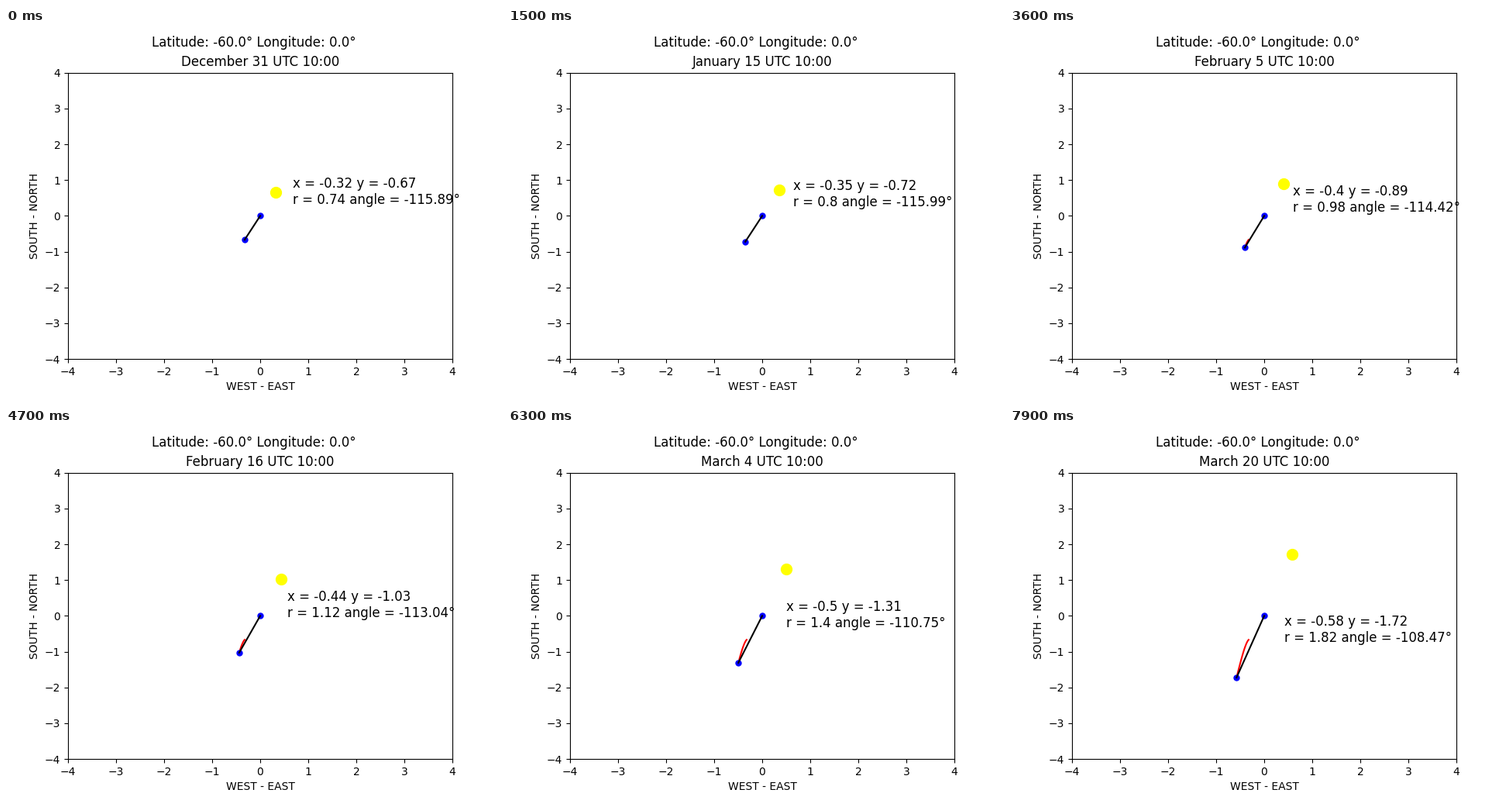
Recreate the animation shown at these times as a matplotlib script. Size 640x480 px, loop 8 s.

```python
import numpy as np
import matplotlib.pyplot as plt
from matplotlib.animation import FuncAnimation

LAT, LON = -60.0, 0.0
HOUR = 10
TILT = np.radians(23.44)
YEAR = 365.2422
EQUINOX = 79.264  # days after December 31, 10:00 UTC
DAYS = 80
MONTHS = (("December", 0), ("January", 31), ("February", 28), ("March", 31))


def shadow(day):
    """Tip of a unit pole's shadow for a uniformly moving sun."""
    lam = 2 * np.pi * (day - EQUINOX) / YEAR
    dec = np.arcsin(np.sin(TILT) * np.sin(lam))
    ra = np.arctan2(np.cos(TILT) * np.sin(lam), np.cos(lam))
    hour = np.radians(15 * (HOUR - 12) + LON) + lam - ra
    lat = np.radians(LAT)
    east = -np.cos(lat) * np.cos(dec) * np.sin(hour)
    north = (np.cos(lat) * np.sin(dec)
             - np.sin(lat) * np.cos(dec) * np.cos(hour))
    up = np.sin(lat) * np.sin(dec) + np.cos(lat) * np.cos(dec) * np.cos(hour)
    return -east / up, -north / up


def date(day):
    if day == 0:
        return "December 31"
    for name, length in MONTHS:
        if day <= length:
            return f"{name} {day}"
        day -= length


days = np.arange(DAYS)
days[0] = 365  # the year closes on December 31
xs, ys = shadow(days)

fig, ax = plt.subplots(figsize=(6.4, 4.8), dpi=100)
fig.suptitle(f"Latitude: {LAT}° Longitude: {LON}°", fontsize=12)
ax.set(xlim=(-4, 4), ylim=(-4, 4), xlabel="WEST - EAST", ylabel="SOUTH - NORTH")
title = ax.set_title("")

trail, = ax.plot([], [], color="red", lw=1.5)
ends, = ax.plot([], [], "o", color="blue", ms=5)
pole, = ax.plot([], [], color="black", lw=1.5)
sun, = ax.plot([], [], "o", color="yellow", ms=10)
label = ax.text(0, 0, "", fontsize=12)


def update(i):
    x, y = xs[i], ys[i]
    trail.set_data(xs[:i + 1], ys[:i + 1])
    ends.set_data([0, x], [0, y])
    pole.set_data([0, x], [0, y])
    sun.set_data([-x], [-y])
    r = float(np.hypot(x, y))
    angle = float(np.degrees(np.arctan2(y, x)))
    label.set_position((x + 1, y + 1))
    label.set_text(f"x = {round(float(x), 2)} y = {round(float(y), 2)}\n"
                   f"r = {round(r, 2)} angle = {round(angle, 2)}°")
    title.set_text(f"{date(i)} UTC {HOUR}:00")
    return trail, ends, pole, sun, label, title


anim = FuncAnimation(fig, update, frames=DAYS, init_func=lambda: update(0),
                     interval=100, repeat=True, repeat_delay=0)
plt.show()
```
